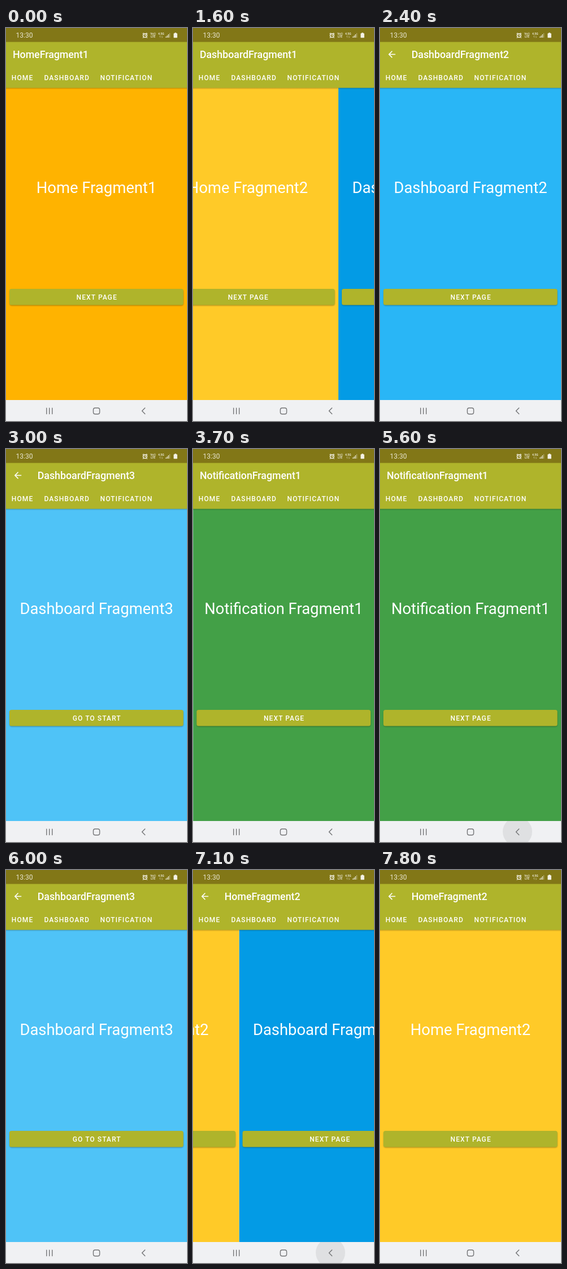
Recreate the animation shown at these times as an HTML page. Size 320 by 693 pixels, loop 8 s.

```html
<!DOCTYPE html>
<html lang="en">
<head>
<meta charset="utf-8">
<title>Tabs with nested navigation</title>
<style>
  html, body { margin: 0; width: 100%; height: 100%; overflow: hidden; background: #f0f1f3; }
  svg { display: block; width: 100vw; height: 100vh; }
  text { font-family: Roboto, sans-serif; fill: #fff; }
  .title { font-size: 17.78px; font-weight: 500; }
  .caps { font-size: 12px; font-weight: 500; letter-spacing: 1.1px; }
  .name { font-size: 27.4px; text-anchor: middle; }
  .mid { text-anchor: middle; }
  .status text { fill: #e9e6d2; }
  .line { fill: none; stroke: #747577; stroke-width: 1.4; stroke-linecap: round; stroke-linejoin: round; }
</style>
</head>
<body>
<svg viewBox="0 0 320 693" preserveAspectRatio="none">
  <defs>
    <linearGradient id="shade" x2="0" y2="1">
      <stop stop-color="#000" stop-opacity=".24"/>
      <stop offset="1" stop-color="#000" stop-opacity="0"/>
    </linearGradient>
    <filter id="soft" x="-5%" y="-30%" width="110%" height="170%"><feGaussianBlur stdDeviation="1"/></filter>
    <clipPath id="navClip"><rect y="656" width="320" height="37"/></clipPath>
    <g id="button">
      <rect x="6.5" y="461.5" width="307" height="28" rx="3.5" opacity=".32" filter="url(#soft)"/>
      <rect x="6" y="460" width="307.6" height="28.4" rx="3.5" fill="#afb42b"/>
    </g>
  </defs>

  <g id="pages"></g>

  <rect y="105" width="320" height="3.5" fill="url(#shade)"/>
  <rect width="320" height="105.6" fill="#afb42b"/>
  <rect width="320" height="24.6" fill="#827717"/>

  <g class="status">
    <text x="17.5" y="17.2" font-size="12">13:30</text>
    <g fill="none" stroke="#f4f2e6">
      <circle cx="245.8" cy="13.2" r="3.3" stroke-width="1.5"/>
      <path d="M245.8 11.4v2h1.6M241.6 10.4l2-1.8M250 10.4l-2-1.8M243 16.4l-1 1.2M248.6 16.4l1 1.2" stroke-width="1.1"/>
    </g>
    <g font-size="5" font-weight="700" class="mid">
      <text x="260" y="12">Vo))</text>
      <text x="260" y="17.4">LTE</text>
      <text x="274.3" y="12">4.5G</text>
    </g>
    <path d="M272.6 17.2v-3.6l-1.3 1.4M275.8 13.6v3.6l1.3-1.4" fill="none" stroke="#b9b27c" stroke-width=".9"/>
    <path d="M282.9 17v-2M285.1 17v-3.8M287.3 17v-6" stroke="#f4f2e6" stroke-width="1.2"/>
    <path d="M289.5 17v-8" stroke="#b3ab70" stroke-width="1.2"/>
    <path d="M298.3 8.3h2.6v1h1q.9 0 .9.9v6.2q0 .9-.9.9h-4.6q-.9 0-.9-.9v-6.2q0-.9.9-.9h1z" fill="#f4f2e6"/>
  </g>

  <path id="up" transform="translate(11.6 37.1) scale(.78)" fill="#fff"
    d="M20 11H7.83l5.59-5.59L12 4l-8 8 8 8 1.41-1.41L7.83 13H20z"/>
  <text id="title" class="title" y="53.2"></text>
  <g class="caps">
    <text x="9.8" y="91.7">HOME</text>
    <text x="67.4" y="91.7">DASHBOARD</text>
    <text x="166.6" y="91.7">NOTIFICATION</text>
  </g>

  <rect y="656" width="320" height="37" fill="#f0f1f3"/>
  <circle id="ripple" cx="243" cy="674.8" r="26" fill="#d7d8da" clip-path="url(#navClip)"/>
  <g class="line">
    <path d="M71.7 670.2v10.4M76.7 670.2v10.4M81.7 670.2v10.4"/>
    <rect x="154.4" y="670" width="11.2" height="10.8" rx="3.2"/>
    <path d="M245.7 670l-5.2 5.3 5.2 5.3"/>
  </g>
</svg>

<script>
const LOOP = 8000, TICK = 100, SLIDE = 350;

const COLORS = {
  Home1: '#ffb300', Home2: '#ffca28',
  Dashboard1: '#039be5', Dashboard2: '#29b6f6', Dashboard3: '#4fc3f7',
  Notification1: '#43a047', Notification2: '#66bb6a'
};

// time, page shown next, slide direction (0 = quick fade)
const MOVES = [
  [500, 'Home2', 0],
  [1585, 'Dashboard1', 1],
  [2300, 'Dashboard2', 0],
  [2900, 'Dashboard3', 0],
  [3440, 'Notification1', 1],
  [4300, 'Notification2', 0],
  [5100, 'Notification1', 0],
  [5680, 'Dashboard3', -1],
  [6500, 'Dashboard2', 0],
  [6800, 'Dashboard1', 0],
  [7080, 'Home2', -1]
];
const BACK_PRESSES = [5000, 5400, 6400, 6700, 6900];

const $ = id => document.getElementById(id);
const clamp = v => Math.min(1, Math.max(0, v));
const easeOut = u => 1 - (1 - u) ** 5;
const fragment = (key, gap) => key.replace(/\d/, n => gap + 'Fragment' + n);

const pages = {};
for (const key in COLORS) {
  const g = document.createElementNS('http://www.w3.org/2000/svg', 'g');
  const label = key === 'Dashboard3' ? 'GO TO START' : 'NEXT PAGE';
  g.innerHTML = `<rect y="100" width="320" height="560" fill="${COLORS[key]}"/>
    <text class="name" x="160" y="291.4">${fragment(key, ' ')}</text>
    <use href="#button"/>
    <text class="caps mid" x="160.7" y="478.8">${label}</text>`;
  pages[key] = $('pages').appendChild(g);
}

function show(key, x, opacity) {
  const g = pages[key];
  g.setAttribute('visibility', 'visible');
  g.setAttribute('transform', `translate(${x} 0)`);
  g.setAttribute('opacity', opacity);
  if (g !== $('pages').lastChild) $('pages').append(g);
}

function rippleAlpha(t) {
  const press = BACK_PRESSES.filter(p => p <= t).pop();
  return press === undefined ? 0 : clamp((400 - (t - press)) / 300);
}

function draw(t) {
  let prev = 'Home1', now = 'Home1', start = -LOOP, dir = 0;
  for (const [at, key, d] of MOVES) {
    if (at > t) break;
    [prev, now, start, dir] = [now, key, at, d];
  }

  for (const key in pages) pages[key].setAttribute('visibility', 'hidden');
  const p = dir ? easeOut(clamp((t - start) / SLIDE)) : clamp((t - start + 100) / 200);
  if (p < 1) show(prev, -dir * p * 320, 1);
  show(now, dir * (1 - p) * 320, dir ? 1 : p);

  const nested = !now.endsWith('1');
  $('up').setAttribute('visibility', nested ? 'visible' : 'hidden');
  $('title').setAttribute('x', nested ? 55.7 : 11.9);
  $('title').textContent = fragment(now, '');
  $('ripple').setAttribute('opacity', rippleAlpha(t));
}

let origin, last = -1;
function frame(time) {
  origin ??= time;
  const t = Math.floor((time - origin) % LOOP / TICK) * TICK;
  if (t !== last) draw(last = t);
  requestAnimationFrame(frame);
}
draw(0);
requestAnimationFrame(frame);
</script>
</body>
</html>
```
